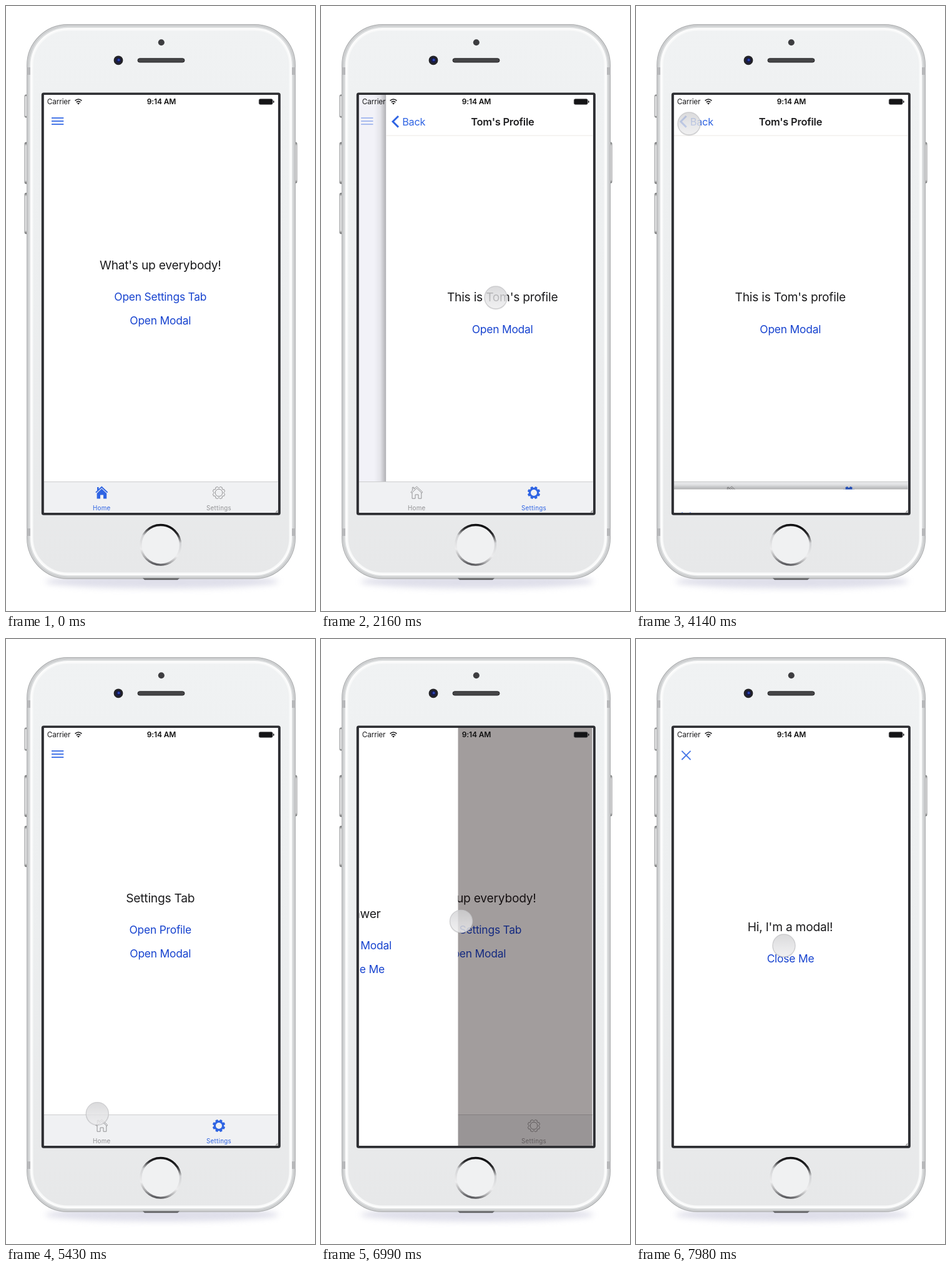
Write an HTML page that moves like this. It is 495 px wide and 967 px high and loops after 8000 ms.

```html
<!DOCTYPE html>
<html lang="en">
<head>
<meta charset="utf-8">
<title>Tabs, stack, modal and drawer</title>
<style>
html, body { margin: 0; width: 100%; height: 100%; overflow: hidden; background: #fff; }
svg { display: block; width: 100%; height: 100%; font-family: Inter, "Noto Sans", sans-serif; }
text { letter-spacing: -.012em; }
.title { font-size: 19.2px; fill: #1b1b1d; text-anchor: middle; }
.link { font-size: 17.4px; fill: #1743cf; text-anchor: middle; }
.head { font-size: 16.4px; font-weight: 600; fill: #1d1d1f; text-anchor: middle; }
.tab { font-size: 9.8px; letter-spacing: .03em; text-anchor: middle; }
.line { fill: none; stroke: #4a79e8; stroke-width: 1.9; }
</style>
</head>
<body>
<svg id="stage" viewBox="0 0 495 967" xmlns="http://www.w3.org/2000/svg"></svg>
<script>
const LOOP = 8000, SLIDE = 420;
const BLUE = '#2f64e3', GRAY = '#929294';
const SCREEN = { x: 61, y: 142, w: 374.5, h: 668 };

const clamp = v => Math.max(0, Math.min(1, v));
const cubic = u => u < .5 ? 4 * u ** 3 : 1 - 4 * (1 - u) ** 3;
const ramp = (t, from, dur) => clamp((t - from) / dur);

// cubic-bezier(.2833, .99, .3183, .99), solved by bisection
function glide(x) {
  const at = (s, a, b) => 3 * s * (1 - s) * ((1 - s) * a + s * b) + s ** 3;
  let lo = 0, hi = 1;
  for (let i = 0; i < 20; i++) {
    const mid = (lo + hi) / 2;
    if (at(mid, .2833, .3183) < x) lo = mid; else hi = mid;
  }
  return at(lo, .99, .99);
}
const slide = (t, start) => t <= start ? 0 : t >= start + SLIDE ? 1 : glide((t - start) / SLIDE);
const dim = (t, at) => 1 - .8 * ramp(t, at, 60) * (1 - ramp(t, at + 110, 200));

// ---------- markup helpers ----------
const text = (cls, x, y, s, extra = '') => `<text class="${cls}" x="${x}" y="${y}" ${extra}>${s}</text>`;
const link = (id, x, y, s) => text('link', x, y, s, `id="${id}"`);
const rect = (x, y, w, h, fill, extra = '') =>
  `<rect x="${x}" y="${y}" width="${w}" height="${h}" fill="${fill}" ${extra}/>`;
const grad = (id, dir, stops) => `<linearGradient id="${id}" ${dir}>` +
  stops.map(([o, c, a = 1]) => `<stop offset="${o}" stop-color="${c}" stop-opacity="${a}"/>`).join('') +
  '</linearGradient>';
const DOWN = 'x1="0" y1="0" x2="0" y2="1"', ACROSS = '';
const sheet = rect(SCREEN.x, SCREEN.y, SCREEN.w, SCREEN.h, '#fff');
const burger = [179, 184, 189].map(y => `<path class="line" d="M73 ${y}H92.3"/>`).join('');

function gear(r1, r2) {
  const pts = [];
  for (let i = 0; i < 8; i++)
    for (const [da, r] of [[-.33, r2], [-.17, r1], [.17, r1], [.33, r2]]) {
      const a = (i + .5) * Math.PI / 4 + da;
      pts.push((341 + r * Math.sin(a)).toFixed(2) + ' ' + (778 - r * Math.cos(a)).toFixed(2));
    }
  return 'M' + pts.join('L') + 'Z';
}
const hole = r => `M${341 - r} 778a${r} ${r} 0 1 0 ${2 * r} 0a${r} ${r} 0 1 0 ${-2 * r} 0Z`;

const homeIcon = on => on
  ? `<path fill="${BLUE}" d="M153.3 767.5L163.3 777L162 778.3L153.3 770.2L144.6 778.3L143.3 777L146 774.4V769H148.6V772Z
     M153.3 771.6L161.2 779V787.6H156V781.5H151V787.6H145.6V779Z"/>`
  : `<path fill="none" stroke="${GRAY}" d="M153.3 768L162.8 777L161.5 778.4L153.3 770.8L145.1 778.4L143.8 777
     L146.4 774.5V769.3H148.8V772.2ZM146 778V787.2H151V781H156V787.2H160.8V778"/>`;
const gearIcon = on => on
  ? `<path fill="${BLUE}" fill-rule="evenodd" d="${gear(10.3, 7.9)}${hole(5)}"/>`
  : `<path fill="none" stroke="${GRAY}" d="${gear(9.9, 7.8)}${hole(5.8)}"/>`;
const tabs = (id, home) => `<g id="${id}">${homeIcon(home)}${gearIcon(!home)}
  ${text('tab', 153.3, 806, 'Home', `fill="${home ? BLUE : GRAY}"`)}
  ${text('tab', 341, 806, 'Settings', `fill="${home ? GRAY : BLUE}"`)}</g>`;

const sideButton = (x, y, h) => rect(x, y, 5, h, 'url(#button)', 'rx="1.8" stroke="#77797b" stroke-width=".8"');
const shell = (inset, fill, extra = '') =>
  rect(33 + inset, 29 + inset, 431 - 2 * inset, 887 - 2 * inset, fill, `rx="${66 - inset}" ${extra}`);
const bands = [98, 835].map(y => rect(33, y, 6, 12, '#b7b8ba') + rect(458, y, 6, 12, '#b7b8ba')).join('');

const phone = `
  <ellipse cx="250" cy="920" rx="187" ry="11" fill="#c9c9dc" opacity=".6" filter="url(#blur)"/>
  ${sideButton(30, 142, 36)}${sideButton(30, 218, 66)}${sideButton(30, 299, 65)}${sideButton(461, 218, 65)}
  ${shell(.6, '#d3d4d6', 'stroke="#aeb0b1" stroke-width="1.2"')}
  ${shell(3, '#dcdedf', 'stroke="#c3c5c6"')}
  ${bands}
  ${shell(6, '#fcfcfc')}
  ${shell(9.5, 'url(#face)', 'stroke="#f8f9f9" stroke-width="2"')}
  <circle cx="248.8" cy="58.3" r="5" fill="#3d3d40"/>
  <circle cx="180" cy="86.8" r="7.4" fill="#232327"/>
  <circle cx="180" cy="86.8" r="4" fill="#161a4a"/><circle cx="180.6" cy="86.2" r="1.9" fill="#2c46b8"/>
  ${rect(211, 83.8, 75, 6.2, '#454547', 'rx="3.1" stroke="#262628"')}
  <circle cx="247.7" cy="861.3" r="31.8" fill="#f0f1f2" stroke="url(#ring)" stroke-width="3.4"/>
  <path d="M219 914.6H278L275 917.2H222Z" fill="#606163"/>
  ${rect(58.8, 140.6, 379, 671.2, '#fff', 'rx="1.5" stroke="#2d2e32" stroke-width="4"')}`;

const status = `
  ${text('', 65.8, 157, 'Carrier', 'font-size="11.8" fill="#1c1c1e"')}
  ${text('', 249, 157, '9:14 AM', 'font-size="12" font-weight="600" fill="#111" text-anchor="middle"')}
  <g fill="none" stroke="#1c1c1e" stroke-width="1.6">
    <path d="M110.6 151.4Q116 146.6 121.4 151.4M112.7 153.8Q116 151 119.3 153.8"/>
  </g>
  <path d="M114 155.4Q116 153.9 118 155.4L116 157.4Z" fill="#1c1c1e"/>
  ${rect(405.3, 148.7, 21.8, 8.6, '#141416', 'rx="2" stroke="#4a4a4c" stroke-width=".8"')}
  ${rect(428, 151.2, 1.5, 3.6, '#141416', 'rx=".7"')}
  <path d="M435.5 805V809.5H431Z" fill="#a5a5a5"/>`;

document.getElementById('stage').innerHTML = `
<defs>
  ${grad('face', DOWN, [[0, '#f0f2f3'], [.5, '#eceeef'], [1, '#e7e8e9']])}
  ${grad('button', DOWN, [[0, '#666'], [.08, '#e6e6e7'], [.92, '#e6e6e7'], [1, '#666']])}
  ${grad('ring', 'x1=".6" y1="0" x2=".4" y2="1"',
    [[0, '#0c0c0e'], [.16, '#2c2c2e'], [.36, '#d2d3d5'], [.7, '#ededee'], [.88, '#a9a9ab'], [1, '#56565a']])}
  ${grad('dot', DOWN, [[0, '#d6d6d8'], [.6, '#e8e8ea'], [1, '#f1f1f2']])}
  ${grad('edgeX', ACROSS, [[0, '#000', 0], [.5, '#000', .06], [1, '#000', .28]])}
  ${grad('edgeY', DOWN, [[0, '#000', 0], [.5, '#000', .07], [1, '#000', .28]])}
  <filter id="blur" x="-10%" y="-150%" width="120%" height="400%"><feGaussianBlur stdDeviation="5"/></filter>
  <clipPath id="clip">${sheet}</clipPath>
</defs>
${phone}
<g clip-path="url(#clip)">
  ${rect(61, 142, 375, 668, '#e9e9f3')}
  <g id="home">${sheet}${burger}
    ${text('title', 247.3, 421.3, "What's up everybody!")}
    ${link('toSettings', 247.3, 471.4, 'Open Settings Tab')}
    ${link('homeModal', 247.3, 509, 'Open Modal')}</g>
  <g id="settings">${sheet}${burger}
    ${text('title', 247.3, 421.3, 'Settings Tab')}
    ${link('toProfile', 247.3, 471.4, 'Open Profile')}
    ${link('setModal', 247.3, 509, 'Open Modal')}</g>
  <g id="profile">${rect(42, 142, 19, 668, 'url(#edgeX)')}${sheet}
    ${rect(61, 206.6, 375, 1, '#ebe8e4')}
    <g id="back"><path d="M80.6 176L71.7 184.8L80.6 193.6" fill="none" stroke="${BLUE}" stroke-width="2.9"/>
      ${text('', 86.8, 190.9, 'Back', `font-size="16.2" fill="${BLUE}"`)}</g>
    ${text('head', 247.5, 191, "Tom's Profile")}
    ${text('title', 247.3, 472.3, "This is Tom's profile")}
    ${link('proModal', 247.3, 522.6, 'Open Modal')}</g>
  ${rect(61, 760, 375, 50, '#f0f1f3')}${rect(61, 760, 375, 1, '#cdcecf')}
  ${tabs('tabsHome', true)}${tabs('tabsSet', false)}
  <g id="shade">${rect(61, 142, 373.5, 668, '#0e0000')}</g>
  <g id="drawer">${rect(61, 142, 310, 668, '#fff')}
    ${text('title', 215, 446, 'Drawer')}
    ${link('drawModal', 215.5, 496, 'Open Modal')}
    ${link('drawClose', 215.5, 533.6, 'Close Me')}</g>
  <g id="modal">${rect(61, 127, 375, 15, 'url(#edgeY)')}${sheet}
    <path id="cross" class="line" d="M73.3 178.8L87.5 193M87.5 178.8L73.3 193"/>
    ${text('title', 247, 467, "Hi, I'm a modal!")}
    ${link('close', 247.5, 517.3, 'Close Me')}</g>
  ${status}
  <g id="touch">
    <circle cy="1" r="18.6" fill="#000" opacity=".08"/>
    <circle r="18" fill="url(#dot)" fill-opacity=".78" stroke="#c6c6c9" stroke-opacity=".8" stroke-width="1.3"/>
  </g>
</g>`;

const el = {};
for (const node of document.querySelectorAll('svg g[id], svg text[id], svg path[id]')) el[node.id] = node;
const show = (node, on) => node.style.display = on ? '' : 'none';
const move = (node, x, y) => node.setAttribute('transform', `translate(${x.toFixed(2)} ${y.toFixed(2)})`);
const fade = (node, a) => node.setAttribute('opacity', a.toFixed(3));

// finger path: start, end, x, y
const FINGER = [
  [0, 210, 96, 208], [210, 480, 290, 472], [735, 765, 284, 475], [930, 1020, 280, 466],
  [2640, 2800, 262, 512], [3660, 3860, 85, 188], [5197, 5497, 149, 784],
  [5860, 6090, 102, 333], [6090, 6260, 252, 410], [6260, 6400, 216, 445],
  [6540, 6700, 66, 452], [6780, 7080, 243, 451.2], [7410, 7530, 237, 490]
];
function finger(t) {
  let [, , x, y] = FINGER[0];
  for (const [a, b, nx, ny] of FINGER) {
    if (t <= a) break;
    const p = cubic(ramp(t, a, b - a));
    x += (nx - x) * p;
    y += (ny - y) * p;
  }
  return [x, y];
}

function draw(t) {
  const onHome = t < 1110 || t >= 5610;
  show(el.home, onHome);
  show(el.tabsHome, onHome);
  show(el.settings, !onHome);
  show(el.tabsSet, !onHome);

  const push = slide(t, 2006) - slide(t, 4730);
  show(el.profile, push > 0);
  move(el.profile, SCREEN.w * (1 - push), 0);
  move(el.settings, -10 * push, 0);
  fade(el.settings, 1 - .65 * push);

  const rise = slide(t, 2920) - slide(t, 3944.5) + slide(t, 7530);
  show(el.modal, rise > 0);
  move(el.modal, 0, SCREEN.h * (1 - rise));

  const [x, y] = finger(t);
  const drag = clamp((x - 66) / 310) * ramp(t, 6780, 1);
  const open = t < 6780 ? 0 : t < 7080 ? drag : .571 + .429 * (1 - (1 - ramp(t, 7080, 240)) ** 3);
  show(el.drawer, open > 0);
  show(el.shade, open > 0);
  move(el.drawer, -310 * (1 - open), 0);
  fade(el.shade, .75 * open);

  fade(el.toSettings, dim(t, 1000));
  fade(el.toProfile, dim(t, 1760));
  fade(el.proModal, dim(t, 2790));
  fade(el.cross, dim(t, 3870));
  fade(el.back, dim(t, 4560));
  fade(el.drawModal, dim(t, 7500));

  show(el.touch, t >= 210);
  move(el.touch, x, y);
}

const begin = performance.now();
function tick() {
  draw((performance.now() - begin) % LOOP);
  requestAnimationFrame(tick);
}
tick();
</script>
</body>
</html>
```
